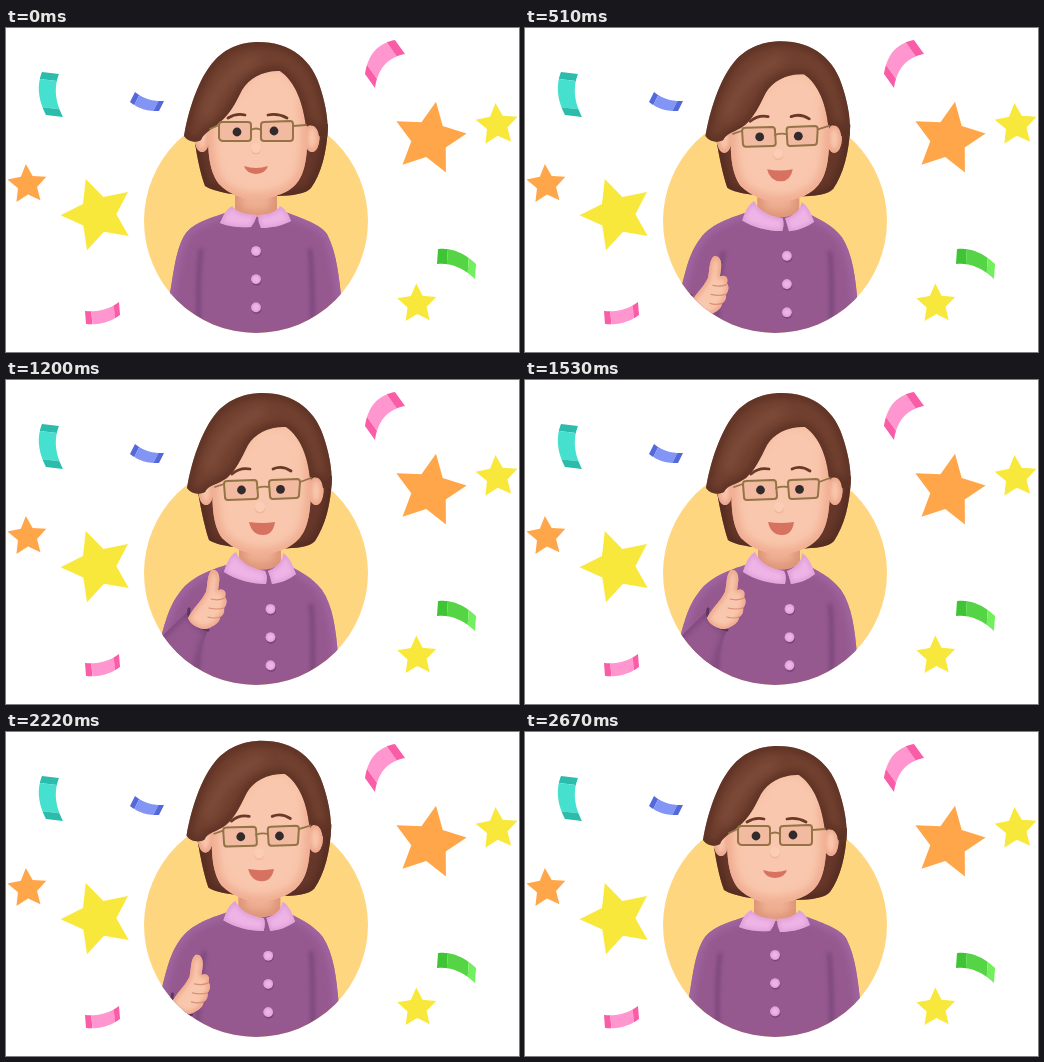
Write an HTML page with a canvas that moves like this. It is 513x324 px and loops after 2700 ms.

```html
<!DOCTYPE html>
<html lang="en">
<head>
<meta charset="utf-8">
<title>Thumbs up</title>
<style>
html, body { margin: 0; width: 100%; height: 100%; overflow: hidden; background: #fff; }
canvas { display: block; width: 513px; height: 324px; }
</style>
</head>
<body>
<canvas id="stage"></canvas>
<script>
const LOOP = 2700;
const canvas = document.getElementById('stage');
const ctx = canvas.getContext('2d');
const ratio = window.devicePixelRatio || 1;
canvas.width = Math.round(513 * ratio);
canvas.height = Math.round(324 * ratio);

const mix = (a, b, k) => a + (b - a) * k;
const ease = (t, from, to) => {
  const u = Math.min(1, Math.max(0, (t - from) / (to - from)));
  return u * u * (3 - 2 * u);
};

// Blend two path strings that share the same commands.
function morph([a, b = a], k) {
  const ends = b.match(/-?[\d.]+/g);
  let i = 0;
  return new Path2D(a.replace(/-?[\d.]+/g, n => mix(+n, +ends[i++], k).toFixed(2)));
}

function fill(path, color) {
  ctx.fillStyle = color;
  ctx.fill(path);
}

function line(path, color, width) {
  ctx.strokeStyle = color;
  ctx.lineWidth = width;
  ctx.stroke(path);
}

// Filled shape with a soft tinted rim, for a rounded look.
function solid(path, color, rim, width = 10, blur = 4) {
  fill(path, color);
  ctx.save();
  ctx.clip(path);
  ctx.filter = `blur(${blur * ratio}px)`;
  line(path, rim, width);
  ctx.restore();
}

function glow(path, color, width, blur) {
  ctx.save();
  ctx.filter = `blur(${blur * ratio}px)`;
  line(path, color, width);
  ctx.restore();
}

function oval(x, y, rx, ry = rx) {
  const path = new Path2D();
  path.ellipse(x, y, rx, Math.max(ry, 0.4), 0, 0, Math.PI * 2);
  return path;
}

function star(x, y, radius, degrees, color) {
  const path = new Path2D();
  for (let i = 0; i < 10; i++) {
    const a = (degrees + i * 36) * Math.PI / 180;
    const r = i % 2 ? radius * 0.49 : radius;
    path.lineTo(x + r * Math.cos(a), y + r * Math.sin(a));
  }
  fill(path, color);
}

// A curve from a over c to b, extruded along v and split into three colours.
function ribbon(a, c, b, v, colors, cuts = [0.17, 0.83]) {
  const at = (i, t) => (1 - t) ** 2 * a[i] + 2 * t * (1 - t) * c[i] + t * t * b[i];
  const edges = [0, ...cuts, 1];
  colors.forEach((color, n) => {
    const strip = new Path2D();
    const steps = 10;
    for (let i = 0; i <= 2 * steps + 1; i++) {
      const back = i > steps;
      const t = mix(edges[n], edges[n + 1], (back ? 2 * steps + 1 - i : i) / steps);
      strip.lineTo(at(0, t) + back * v[0], at(1, t) + back * v[1]);
    }
    fill(strip, color);
  });
}

const SHAPES = {
  bob: [
    'M187 100 C190 125 194 145 199 158 C210 165 235 168 250 167 C275 169 298 168 305 160 C315 146 321 125 322 97 L300 60 L204 60Z',
    'M190 100 C194 125 198 145 203 160 C213 167 238 168 254 168 C280 169 302 169 309 161 C319 146 325 125 326 97 L304 60 L208 60Z'],
  cap: [
    'M178 108 C182 84 192 50 209 32 C223 17 240 14 252 14 C285 14 307 32 315 62 C320 78 323 95 321 110 L313 108 C312 98 306 96 300 98 C297 76 290 54 274 43 C258 42 243 50 236 62 C229 76 224 86 214 94 C206 102 198 104 195 112 C190 115 182 114 178 108Z',
    'M181 108 C185 84 195 50 212 31 C227 16 244 13 256 13 C289 13 311 31 319 61 C324 77 327 94 325 108 L317 108 C316 98 311 96 304 98 C302 78 295 57 280 47 C264 46 249 53 242 65 C235 79 230 90 221 98 C211 105 202 105 199 112 C193 115 185 114 181 108Z'],
  shine: [
    'M200 88 C207 65 222 45 248 32',
    'M203 88 C211 63 228 43 256 31'],
  face: [
    'M203 90 C201 118 202 142 213 156 C223 167 238 171 250 171 C268 170 285 165 293 152 C301 140 303 115 300 85 L300 60 L280 36 L248 36 L212 80Z',
    'M208 90 C205 120 206 144 216 158 C227 169 241 174 256 174 C273 173 289 167 297 153 C305 140 306 115 304 85 L305 60 L286 40 L252 40 L220 80Z'],
  neck: ['M229 155 L229 184 Q250 194 271 184 L271 155Z', 'M233 155 L233 184 Q256 195 275 184 L275 155Z'],
  body: [
    'M229 181 C208 190 191 192 180 205 C168 222 167 255 162 275 L158 330 L342 330 L336 275 C333 250 331 225 321 206 C312 194 293 190 272 181Z',
    'M233 181 C210 188 186 195 174 212 C160 230 158 250 150 275 L148 330 L340 330 L332 275 C330 250 327 226 316 210 C306 197 294 191 274 181Z'],
  leftSeam: ['M195 222 C192 245 192 270 193 320', 'M199 225 C195 245 192 270 190 320'],
  rightSeam: ['M304 222 C307 245 306 270 307 320', 'M305 225 C308 245 306 270 307 320'],
  leftCollar: [
    'M226 178 C219 182 217 189 214 195 C224 199 235 200 245 199 Q249 194 251 187 C240 187 230 184 226 178Z',
    'M230 172 C222 177 220 186 218 192 C230 200 246 204 260 204 Q262 196 259 191 C246 189 234 183 230 172Z'],
  rightCollar: [
    'M274 178 C281 182 283 188 285 193 C275 198 265 200 255 200 Q252 194 252 187 C262 187 271 184 274 178Z',
    'M277 173 C285 178 287 187 290 194 C283 200 274 203 266 204 Q264 196 262 191 C270 188 277 182 277 173Z'],
  brows: [
    'M222 90 Q230 85 239 87 M262 87 Q272 85 281 90',
    'M226 94 Q234 87 244 89 M267 89 Q276 85 285 91'],
  lenses: [
    'M216 94 L242 94 Q245 94 245 97 L245 110 Q245 113 242 113 L217 113 Q214 113 213 110 L213 97 Q213 94 216 94Z M258 94 L284 93 Q287 93 287 96 L287 110 Q287 113 284 113 L258 113 Q255 113 255 110 L255 97 Q255 94 258 94Z',
    'M221 101 L248 100 Q251 100 251 103 L252 116 Q252 119 249 119 L222 120 Q219 120 219 117 L218 104 Q218 101 221 101Z M266 100 L291 99 Q294 99 294 102 L293 115 Q293 118 290 118 L267 119 Q264 119 264 116 L263 103 Q263 100 266 100Z'],
  frame: [
    'M213 97 L204 101 M245 102 Q250 99 255 102 M287 98 L300 97',
    'M218 104 L209 107 M251 108 Q257 106 263 107 M294 102 L305 98'],
  mouth: [
    'M238 138 Q250 142 262 138 Q260 145 250 146 Q240 145 238 138Z',
    'M243 142 Q256 144 269 142 Q267 155 257 155 Q246 155 243 142Z'],
};
const SLEEVE = new Path2D('M142 270 L182 231 C185 242 193 248 202 250 C196 265 190 280 184 320 L142 320Z');
const CUFF = new Path2D('M183 229 C181 238 187 246 202 250');
const HAND = new Path2D('M182 238 C187 228 195 222 200 212 C202 204 201 194 206 190 C213 189 214 197 213 203 L212 210 C217 208 221 211 219 217 C222 221 220 226 218 228 C219 233 216 236 214 237 C214 243 207 246 203 248 C196 251 185 246 182 238Z');
const FINGERS = new Path2D('M205 219 Q212 221 219 218 M203 228 Q211 230 218 228 M202 237 Q208 239 214 237');

const PURPLE = '#95598f', PURPLE_RIM = '#a468a6', FOLD = '#6f3f74';
const SKIN = '#f9c7ad', SKIN_RIM = '#eda589';
const HAIR = '#72402f', HAIR_RIM = '#562d21';
const PINK = '#efb4e6', PINK_RIM = '#d896d2';

function drawConfetti() {
  star(423.5, 110.8, 37.5, -80, '#ffa64a');
  star(21.3, 156.5, 20.5, -94, '#ffa64a');
  star(92, 186.5, 37.5, 179, '#f9e83c');
  star(491, 97, 22, -94, '#f9e83c');
  star(411, 276, 20.5, -92, '#f9e83c');
  ribbon([36, 44], [28, 64], [40, 87], [17, 2], ['#2bbcac', '#46e0cf', '#2bbcac']);
  ribbon([124, 74], [136, 84], [153, 83], [5, -10], ['#5268dc', '#8295f5', '#5268dc']);
  ribbon([359, 46], [363, 17], [389, 12], [10, 14], ['#fb5ca6', '#ff96d0', '#fb5ca6']);
  ribbon([79, 283], [98, 285], [113, 274], [1, 13], ['#fb5ca6', '#ff96d0', '#fb5ca6']);
  ribbon([432, 221], [452, 219], [470, 236], [-1, 15], ['#3fc435', '#55d445', '#72ee5f'], [0.25, 0.8]);
}

function drawTorso(p, reach) {
  solid(morph(SHAPES.body, p), PURPLE, PURPLE_RIM, 8, 4);
  for (const seam of [SHAPES.leftSeam, SHAPES.rightSeam]) {
    glow(morph(seam, p), FOLD, 3, 2);
  }
  for (let i = 0; i < 3; i++) {
    const x = mix(250, 264.5, p), y = mix(223, 229, p) + i * 28.2;
    fill(oval(x + 0.5, y + 1.5, 5), '#7b467c');
    solid(oval(x, y, 4.8), PINK, PINK_RIM, 2, 1);
  }
  if (reach >= 1) return;
  ctx.save();
  ctx.translate(-49 * reach, 110 * reach);
  solid(SLEEVE, PURPLE, FOLD, 4, 3);
  line(CUFF, '#5d3463', 3);
  solid(HAND, SKIN, SKIN_RIM, 5, 2);
  line(FINGERS, '#d98f78', 1.2);
  ctx.restore();
}

function drawNeck(p) {
  solid(morph(SHAPES.neck, p), '#efb093', '#d98e72', 10, 5);
  for (const side of [SHAPES.leftCollar, SHAPES.rightCollar]) {
    solid(morph(side, p), PINK, PINK_RIM, 3, 2);
  }
}

function drawHead(p, blink) {
  for (const [a, b] of [[196, 200], [306, 310]]) {
    solid(oval(mix(a, b, p), mix(110, 111, p), 7.5, 14), SKIN, SKIN_RIM, 6, 2);
  }
  solid(morph(SHAPES.face, p), SKIN, SKIN_RIM, 9, 5);
  const cap = morph(SHAPES.cap, p);
  solid(cap, HAIR, HAIR_RIM, 7, 4);
  ctx.save();
  ctx.clip(cap);
  glow(morph(SHAPES.shine, p), '#82503d', 9, 6);
  ctx.restore();

  const noseX = mix(250, 254, p), noseY = mix(120, 127, p);
  fill(oval(noseX, noseY + 2, 5, 4.5), '#f2b69b');
  fill(oval(noseX, noseY, 4.8, 5), '#fbcdb5');
  fill(morph(SHAPES.mouth, p), '#d6725f');
  const lenses = morph(SHAPES.lenses, p);
  fill(lenses, 'rgba(215,135,105,0.2)');
  line(morph(SHAPES.brows, p), '#6a3927', 2.8);
  for (const [a, b, c, d] of [[231, 235.5, 104, 110], [268, 274.5, 103, 109.3]]) {
    fill(oval(mix(a, b, p), mix(c, d, p), 4.4, mix(4.4, 0.8, blink)), '#332b2b');
  }
  line(lenses, '#947446', 2);
  line(morph(SHAPES.frame, p), '#947446', 1.8);
}

function draw(t) {
  const pose = ease(t, 30, 690) - ease(t, 2090, 2610);
  const reach = 1 - ease(t, 240, 690) + ease(t, 2100, 2410);
  const lift = -7 * (ease(t, 2100, 2310) - ease(t, 2310, 2610));
  const blink = ease(t, 1200, 1350) - ease(t, 1380, 1530);

  ctx.setTransform(ratio, 0, 0, ratio, 0, 0);
  ctx.lineCap = ctx.lineJoin = 'round';
  ctx.fillStyle = '#fff';
  ctx.fillRect(0, 0, 513, 324);
  drawConfetti();

  const disc = oval(250, 193, 112);
  fill(disc, '#ffd680');
  ctx.save();
  ctx.translate(0, lift);
  solid(morph(SHAPES.bob, pose), '#67382a', '#50291e', 8, 4);
  ctx.restore();

  ctx.save();
  ctx.clip(disc);
  ctx.translate(0, lift);
  drawTorso(pose, reach);
  ctx.restore();

  ctx.save();
  ctx.translate(0, lift);
  drawNeck(pose);
  drawHead(pose, blink);
  ctx.restore();
}

function tick() {
  draw(performance.now() % LOOP);
  requestAnimationFrame(tick);
}
tick();
</script>
</body>
</html>
```
